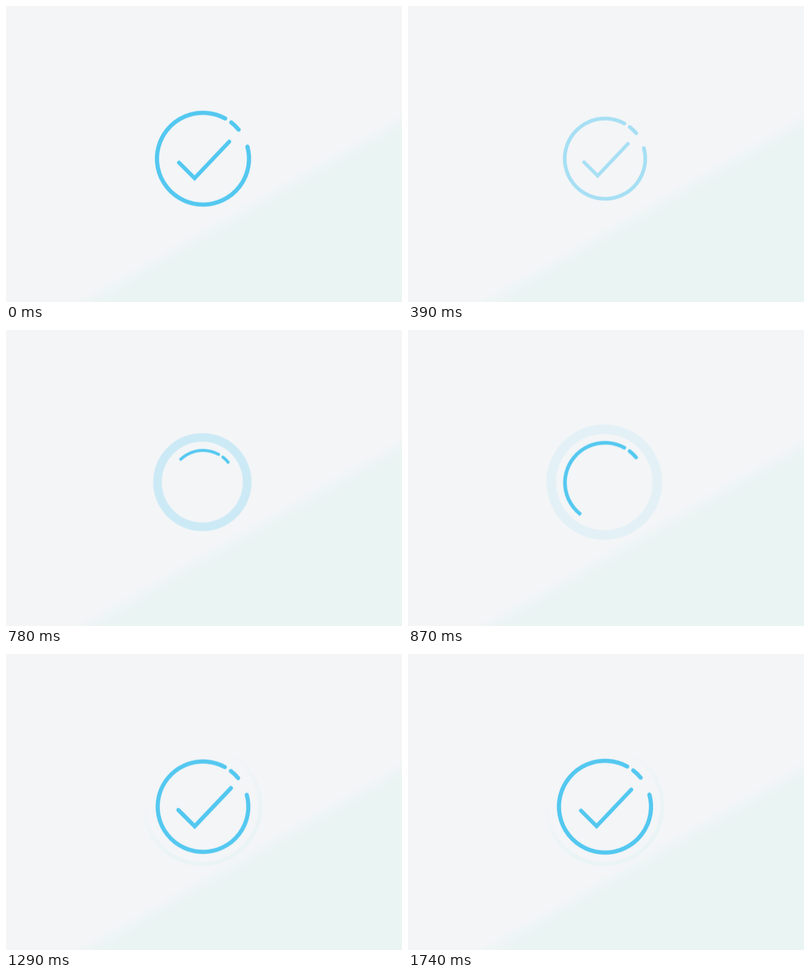
An HTML page without scripts that plays this animation: 800 px wide and 600 px high, repeating every 1770 ms.

```html
<!DOCTYPE html>
<html lang="en">
<head>
<meta charset="utf-8">
<title>Success check</title>
<style>
  html, body { margin: 0; width: 100%; height: 100%; overflow: hidden; }
  body { background: linear-gradient(150deg, #f3f5f7 63.8%, #eaf4f3 67.4%); }
  svg { display: block; width: 100%; height: 100%; }

  :root { --loop: 1770ms linear infinite; }

  .line { fill: none; stroke: #54c8f0; stroke-width: 8.5; stroke-linecap: round; }
  .badge { animation: shrink var(--loop), fade var(--loop); }
  .ring { animation: grow var(--loop); }
  .sweep {
    fill: none; stroke: #fff; stroke-width: 20;
    stroke-dasharray: 100 200;
    animation: sweep var(--loop);
  }
  .check {
    stroke-width: 8;
    transform-origin: -20.8px 36.7px;
    animation: pop var(--loop), thin var(--loop);
  }
  .ripple {
    fill: none; stroke: #54c8f0;
    animation: spread var(--loop), dissolve var(--loop);
  }
  .halo { fill: none; stroke: url(#haze); stroke-width: 8; animation: linger var(--loop); }

  /* exit: back-in scale, quadratic fade */
  @keyframes shrink {
    0% { transform: scale(1); }
    13.56% { transform: scale(1); animation-timing-function: cubic-bezier(.333, 0, .667, -.567); }
    25.42%, 30% { transform: scale(0); }
    30.01%, 100% { transform: scale(1); }
  }
  @keyframes fade {
    0% { opacity: 1; }
    13.56% { opacity: 1; animation-timing-function: cubic-bezier(.333, 0, .667, .333); }
    25.42%, 33.88% { opacity: 0; }
    33.89%, 100% { opacity: 1; }
  }

  /* entrance: quadratic growth, then settle */
  @keyframes grow {
    0%, 30% { transform: scale(1); }
    30.01% { transform: scale(.57); }
    33.9% { transform: scale(.57); animation-timing-function: cubic-bezier(.333, 0, .667, .333); }
    54.8% { transform: scale(1.13); animation-timing-function: cubic-bezier(.33, .47, .67, .8); }
    59.32% { transform: scale(1.033); animation-timing-function: ease-out; }
    67.8% { transform: scale(.98); animation-timing-function: ease-in-out; }
    83.62% { transform: scale(1.002); animation-timing-function: ease-in-out; }
    96.05%, 100% { transform: scale(1); }
  }
  @keyframes sweep {
    0%, 30% { stroke-dashoffset: 0; }
    30.01% { stroke-dashoffset: 100; }
    33.9% { stroke-dashoffset: 100; animation-timing-function: cubic-bezier(.333, 0, .667, .333); }
    54.8%, 100% { stroke-dashoffset: 0; }
  }
  @keyframes pop {
    0%, 30% { transform: scale(1); }
    30.01% { transform: scale(0); }
    56.95% { transform: scale(0); animation-timing-function: cubic-bezier(.333, 1.567, .667, 1); }
    76.89%, 100% { transform: scale(1); }
  }
  @keyframes thin {
    0%, 30% { stroke-width: 8; }
    30.01%, 56.95% { stroke-width: 12; }
    59.32% { stroke-width: 10.5; }
    64.41%, 100% { stroke-width: 8; }
  }
  @keyframes spread {
    0% { r: 0; stroke-width: 8.5; }
    34.46% { r: 0; stroke-width: 8.5; animation-timing-function: cubic-bezier(.333, 1, .667, 1); }
    57.34%, 100% { r: 112.3px; stroke-width: 19.5; }
  }
  @keyframes dissolve {
    0%, 33.88% { opacity: 0; }
    33.9% { opacity: .54; }
    52.66%, 100% { opacity: 0; }
  }
  @keyframes linger {
    0%, 52.5% { opacity: 0; }
    52.51%, 100% { opacity: 1; }
  }
</style>
</head>
<body>
<svg viewBox="0 0 800 600">
  <defs>
    <linearGradient id="haze" gradientUnits="userSpaceOnUse" x1="-30" y1="-52" x2="25" y2="43.3">
      <stop offset="0" stop-color="#ebf4f4" stop-opacity="0"/>
      <stop offset="1" stop-color="#ebf4f4"/>
    </linearGradient>
    <mask id="reveal" maskUnits="userSpaceOnUse" x="-120" y="-120" width="240" height="240">
      <path class="sweep" pathLength="100" d="M50.7-78A93 93 0 1 0 84.3-39.4"/>
    </mask>
  </defs>
  <g transform="translate(398 309.5)">
    <g transform="translate(-1.4 -1.2)">
      <circle class="halo" r="117.5"/>
      <circle class="ripple" r="0"/>
    </g>
    <g class="badge">
      <g class="ring">
        <path class="line" mask="url(#reveal)" d="M89.7-24.4A93 93 0 1 1 44.8-81.5"/>
        <path class="line" d="M57-73.5A93 93 0 0 1 72-58.9"/>
      </g>
      <path class="line check" d="M-48.5 8L-17 39.5L53-34.5"/>
    </g>
  </g>
</svg>
</body>
</html>
```
